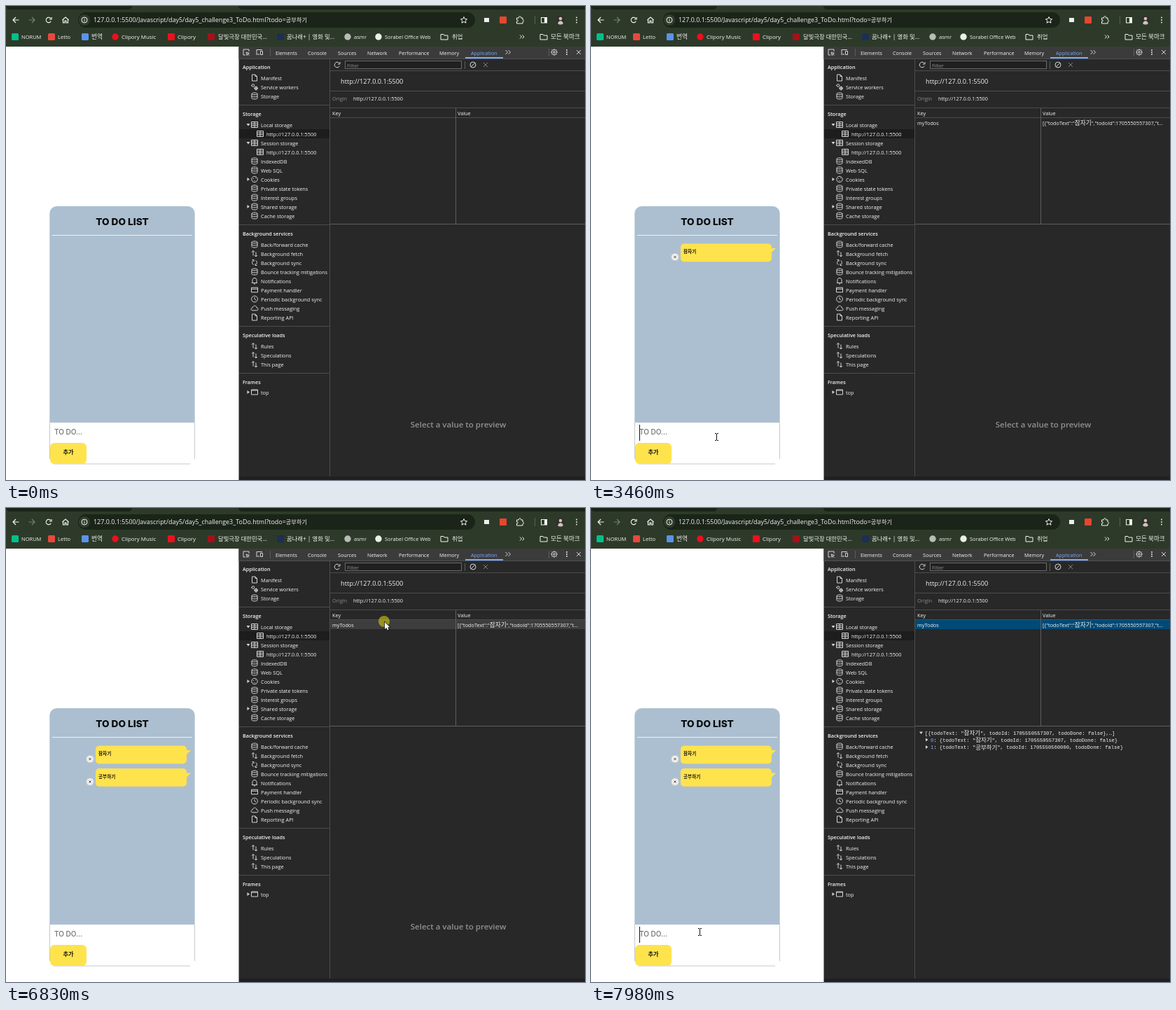
These frames come from a looping animation (827x677 px, 8 s). An HTML page with a canvas:

```html
<!DOCTYPE html>
<html lang="ko">
<head>
<meta charset="utf-8">
<title>To do list</title>
<style>
html, body { margin: 0; width: 100%; height: 100%; overflow: hidden; background: #fff; }
canvas { display: block; width: 827px; height: 677px; }
</style>
</head>
<body>
<canvas id="stage"></canvas>
<script>
const W = 827, H = 677, LOOP = 8000;
const canvas = document.getElementById('stage');
const g = canvas.getContext('2d');
const dpr = window.devicePixelRatio || 1;
canvas.width = W * dpr;
canvas.height = H * dpr;

const UI = '"Open Sans", "Noto Sans CJK KR", sans-serif';
const ROUND = 'Inter, "Noto Sans CJK KR", sans-serif';
const MONO = '"Liberation Mono", "Noto Sans CJK KR", monospace';
const LIGHT = '#f4f4f4', ICON = '#d4d4d4', LINE = '#4c4c4c', PANEL = '#282828';
const YELLOW = '#ffe34d', BLUE = '#acbfd0';

// ---- drawing helpers ----
function rect(x, y, w, h, color) {
  g.fillStyle = color;
  g.fillRect(x, y, w, h);
}

function round(x, y, w, h, r, color) {
  g.fillStyle = color;
  g.beginPath();
  g.roundRect(x, y, w, h, r);
  g.fill();
}

function disc(x, y, r, color) {
  g.fillStyle = color;
  g.beginPath();
  g.arc(x, y, r, 0, 7);
  g.fill();
}

function ring(x, y, r, from = 0, to = 2 * Math.PI) {
  g.beginPath();
  g.arc(x, y, r, from, to);
  g.stroke();
}

function path(d, x, y, fill) {
  g.save();
  g.translate(x, y);
  const p = new Path2D(d);
  if (fill) { g.fillStyle = fill; g.fill(p); } else g.stroke(p);
  g.restore();
}

function pen(color, width = 1) {
  g.strokeStyle = color;
  g.lineWidth = width;
}

// y is the middle of the capitals
function text(s, x, y, size, color = LIGHT, family = UI, weight = 400, align = 'left') {
  g.font = `${weight} ${size}px ${family}`;
  g.fillStyle = color;
  g.textAlign = align;
  g.fillText(s, x, Math.round(y + size * 0.36));
  return g.measureText(s).width;
}

// Hangul runs are set a little larger than the Latin ones
function mixed(s, x, y, size, color, family) {
  for (const run of s.split(/([가-힣]+)/)) {
    const hangul = /[가-힣]/.test(run);
    x += text(run, x, y, hangul ? size * 1.19 : size, color, hangul ? UI : family);
  }
}

// ---- browser bars ----
const marks = [
  ['NORUM', 22, 7.5, 13, '#00c08a', 0],
  ['Letto', 74, 7.6, 65, '#e8483c', 0],
  ['번역', 122, 8.6, 113, '#5a93e8', 0],
  ['Clipory Music', 165, 7.9, 156, '#f00f1c', 1],
  ['Clipory', 245, 8, 236, '#f00f1c', 0],
  ['달빛극장 대한민국...', 303, 8.3, 293, '#a5101a', 0],
  ['꿈나래+ | 영화 및...', 401, 8.3, 392, '#1c2f56', 0],
  ['asmr', 497, 7.6, 488, '#b9bcb8', 1],
  ['Sorabel Office Web', 541, 7.4, 532, '#eceeea', 1],
];

function folder(x, y) {
  pen(LIGHT);
  path('M-5 -3.5H-1L0 -2H5V4H-5Z', x, y);
}

function dots(x, y, step) {
  for (const k of [-1, 0, 1]) disc(x, y + k * step, 0.9, LIGHT);
}

function browser() {
  rect(0, 0, W, 58, '#2d3a29');
  round(0, -6, 180, 11, 5, '#1b2418');
  round(332, -6, 500, 11, 5, '#1b2418');
  pen(LIGHT, 1.2);
  path('M4.5 0H-4M0 -4L-4 0L0 4', 14, 20);
  ring(61, 20, 3.7, 0.5, 5.6);
  path('M4 -4V-1H1', 61, 20);
  path('M-3.5 -.5V4H-1V1H1V4H3.5V-.5M-4.5 0L0 -4L4.5 0', 85, 20);
  pen('#77806f', 1.2);
  path('M-4.5 0H4M0 -4L4 0L0 4', 37, 20);
  round(103, 9, 567, 22, 11, '#1b2418');
  disc(112, 20, 8, '#303c2c');
  pen(LIGHT);
  ring(112, 20, 4);
  path('M0 -.5V2.2M0 -2.4V-1.4', 112, 20);
  const w = text('127.0.0.1:5500/Javascript/day5/day5_challenge3_ToDo.html?todo=', 125, 20, 8.95);
  text('공부하기', 125 + w, 20, 8.2);
  path('M0 -4.5L1.4 -1.5L4.6 -1.2L2.2 1L3 4.2L0 2.5L-3 4.2L-2.2 1L-4.6 -1.2L-1.4 -1.5Z', 654, 20);
  rect(683, 17, 7, 6, '#eeeeee');
  round(705, 15, 10, 10, 1, '#e8452e');
  path('M-4.5 -3H-1.5C-2 -6 2 -6 1.5 -3H4V0C6 -.5 6 3 4 2.5V5H-4.5V2C-2 2.5 -2 -1 -4.5 0Z', 734, 20);
  rect(755, 14, 1, 12, '#56634f');
  g.strokeRect(764.5, 16.5, 8, 7.5);
  rect(769, 16, 4, 8, LIGHT);
  disc(792, 20, 6.5, '#33302c');
  disc(792, 18, 2.3, '#cfc4be');
  path('M-3.8 5C-3 0 3 0 3.8 5C2 7 -2 7 -3.8 5Z', 792, 20, '#cfc4be');
  dots(815, 20, 3.5);

  for (const [label, x, size, ix, color, circle] of marks) {
    if (circle) disc(ix, 44, 4.7, color);
    else round(ix - 5, 39, 10, 10, 1.5, color);
    text(label, x, 44, size);
  }
  folder(626, 44);
  text('취업', 637, 44, 8.4);
  path('M-3 -2.5L-.5 0L-3 2.5M.5 -2.5L3 0L.5 2.5', 737, 44);
  folder(768, 44);
  text('모든 북마크', 778, 44, 8.6);
}

// ---- sidebar ----
const icons = {
  db: 'M-4 -3C-4 -5 4 -5 4 -3V3C4 5 -4 5 -4 3ZM-4 -3C-4 -1.3 4 -1.3 4 -3M-4 0C-4 1.8 4 1.8 4 0',
  grid: 'M-4.5 -4H4.5V4H-4.5ZM-4.5 -1.3H4.5M-4.5 1.3H4.5M0 -4V4',
  doc: 'M-3.5 -4.5H1L3.5 -2V4.5H-3.5ZM1 -4.5V-2H3.5',
  gears: 'M-3.8 -2A1.8 1.8 0 1 1 -.2 -2A1.8 1.8 0 1 1 -3.8 -2M0 2A2.2 2.2 0 1 1 4.4 2A2.2 2.2 0 1 1 0 2M-5 -2H-4M2.2 -1V5M-.8 2H5',
  cookie: 'M-4.2 0A4.2 4.2 0 1 1 4.2 0A4.2 4.2 0 1 1 -4.2 0M-2 -1H-1M1 -2H2M0 2H1M-2 2H-1.5',
  swap: 'M-2 3V-4M-4 -2L-2 -4L0 -2M2 -2V4.5M0 2.5L2 4.5L4 2.5',
  sync: 'M-1.4 3.1A3.4 3.4 0 0 1 -1.7 -3M1.6 -3A3.4 3.4 0 0 1 1.8 2.9M-3.5 -4H-1V-1.5M3.5 4H1V1.5',
  bell: 'M-4 3H4M-3 3V-1C-3 -5 3 -5 3 -1V3M-1 4.5H1',
  card: 'M-4.5 -3.3H4.5V3.3H-4.5ZM-4.5 -1.2H4.5',
  clock: 'M-4.4 0A4.4 4.4 0 1 1 4.4 0A4.4 4.4 0 1 1 -4.4 0M0 -2.5V0L2 1.5',
  cloud: 'M-3 3.3C-6 3 -5 -1 -2.6 -.7C-2 -4.5 3 -4 3 -.5C6 -.3 5.5 3.3 3.2 3.3Z',
  frame: 'M-4.5 -3.5H4.5V3.5H-4.5ZM-4.5 -2.5H4.5',
};

const HOST = 'http://127.0.0.1:5500';
// header, header y, first row y, rows: icon + label; ">" closed, "v" open, "-" indented
const groups = [
  ['Application', 87, 103, ['doc Manifest', 'gears Service workers', 'db Storage']],
  ['Storage', 154, 170, ['vgrid Local storage', '-grid ' + HOST, 'vgrid Session storage', '-grid ' + HOST,
    'db IndexedDB', 'db Web SQL', '>cookie Cookies', 'db Private state tokens', 'db Interest groups',
    '>db Shared storage', 'db Cache storage']],
  ['Background services', 325, 341, ['db Back/forward cache', 'swap Background fetch', 'sync Background sync',
    'db Bounce tracking mitigations', 'bell Notifications', 'card Payment handler',
    'clock Periodic background sync', 'cloud Push messaging', 'doc Reporting API']],
  ['Speculative loads', 470, 486, ['swap Rules', 'swap Speculations', 'swap This page']],
  ['Frames', 537, 552, ['>frame top']],
];

function twisty(x, y, open) {
  path(open ? 'M-2.5 -1.5H2.5L0 2Z' : 'M-1.5 -2.5V2.5L2 0Z', x, y, ICON);
}

function sidebar() {
  rect(333, 176, 129, 13, '#1d1d1d');
  for (const [title, ty, first, rows] of groups) {
    text(title, 338, ty, 7.25, LIGHT, UI, 600);
    rows.forEach((row, i) => {
      const [, mark, icon, label] = row.match(/^([v>-]?)(\w+) (.*)$/);
      const y = first + i * 13, shift = mark === '-' ? 8 : 0;
      if (mark && !shift) twisty(346, y - 0.5, mark === 'v');
      pen(ICON);
      path(icons[icon], 355 + shift, y - 0.5);
      text(label, 364 + shift, y, 7.35);
    });
  }
  for (const y of [141, 312, 457, 524]) rect(333, y, 129, 1, LINE);
  rect(462, 76, 1, 597, LINE);
}

// ---- developer tools ----
const tabs = [['Elements', 385], ['Console', 431], ['Sources', 474], ['Network', 516],
  ['Performance', 561], ['Memory', 619], ['Application', 664]];

function tools(s) {
  rect(332.5, 58, 495, 619, PANEL);
  rect(332.5, 58, 495, 18, '#3b3b3b');
  rect(333, 75, 494, 1, '#505050');
  pen(ICON);
  path('M4 -1V-4H-4V4H-1M0 0L4.5 1.5L2 2.3L1.3 4.6ZM2 2.3L4.5 4.5', 343, 66);
  path('M-4 2V-3.5H4M-5 3H0M1.5 -1.5H4.5V3.5H1.5Z', 362, 66);
  rect(377, 61, 1, 11, '#5c5c5c');
  rect(775, 61, 1, 11, '#5c5c5c');
  for (const [label, x] of tabs) text(label, x, 67, 7.2, label === 'Application' ? '#7cacf8' : LIGHT);
  rect(656, 73, 54, 2, '#7cacf8');
  path('M-3.5 -3L-.5 0L-3.5 3M.5 -3L3.5 0L.5 3', 717, 66);
  ring(783, 66, 3.7);
  ring(783, 66, 1.4);
  for (let a = 0; a < 8; a++) {
    const c = Math.cos(a * Math.PI / 4), n = Math.sin(a * Math.PI / 4);
    path(`M${c * 3.7} ${n * 3.7}L${c * 4.8} ${n * 4.8}`, 783, 66);
  }
  dots(801, 66, 3);
  path('M-3 -3L3 3M3 -3L-3 3', 818, 66);
  sidebar();

  pen(ICON);
  ring(473, 84, 3.8, 0.5, 5.6);
  path('M4 -4V-1H1', 473, 84);
  round(484, 78.5, 166, 11, 2, '#202020');
  pen('#6b6b6b');
  g.strokeRect(484.5, 78.5, 166, 11);
  text('Filter', 487, 85, 7.2, '#8f8f8f');
  rect(655, 79, 1, 11, '#5c5c5c');
  pen(ICON);
  ring(667, 84, 4);
  path('M-2.8 2.8L2.8 -2.8', 667, 84);
  pen('#808080');
  path('M-3 -3L3 3M3 -3L-3 3', 685, 84);
  rect(463, 92, 364, 1, LINE);
  text(HOST, 478, 107.5, 9.2);
  rect(463, 121, 364, 1, LINE);
  text('Origin', 466, 132, 7.4, '#8a8a8a');
  text(HOST, 496, 132, 7.3);

  if (s.hover === 'row') rect(463, 160, 364, 13, '#3d3d3d');
  if (s.hover === 'rest') rect(463, 186, 364, 125, '#3d3d3d');
  if (s.selected) rect(463, 160, 364, 13, '#004a77');
  rect(463, 145, 364, 1, LINE);
  rect(463, 159, 364, 1, LINE);
  rect(642, 146, 1, 165, '#5e5e5e');
  rect(463, 311, 364, 1, '#5e5e5e');
  text('Key', 466, 153, 7.3);
  text('Value', 645, 153, 7.3);
  if (s.stored) {
    text('myTodos', 466, 167, 7.3);
    mixed('[{"todoText":"잠자기","todoId":1705550557307,"t...', 645, 167, 7.3, LIGHT, UI);
  }
  if (s.selected) preview();
  else text('Select a value to preview', 646, 598, 11.5, '#919191', UI, 600, 'center');
  rect(333, 672, 494, 5, '#202020');
}

function preview() {
  const entry = (word, id) => `{todoText: "${word}", todoId: ${id}, todoDone: false}`;
  const lines = [entry('잠자기', 1705550557307), entry('공부하기', 1705550560000)];
  twisty(471.5, 321, true);
  mixed(`[${lines[0]},…]`, 477, 321, 7.13, LIGHT, MONO);
  lines.forEach((line, i) => {
    const y = 331 + i * 10.5;
    twisty(479.5, y, false);
    text(i, 485, y, 7.13, '#8ba4ff', MONO);
    mixed(': ' + line, 489.3, y, 7.13, LIGHT, MONO);
  });
}

// ---- to-do page ----
function bubble(word, y) {
  round(128, y, 130, 25.7, 5, YELLOW);
  path('M-2 0H7L-1 8Z', 257, y + 6.5, YELLOW);
  text(word, 132, y + 11.5, 6.6, '#1c1a10', ROUND, 700);
  disc(120, y + 19, 5.5, '#eeeeee');
  pen('#b5b5b5', 0.6);
  ring(120, y + 19, 5.3);
  pen('#333', 0.9);
  path('M-1.4 -1.4L1.4 1.4M1.4 -1.4L-1.4 1.4', 120, y + 19);
}

function page(s) {
  rect(0, 58, 333, 619, '#fff');
  pen('#c4c8cc');
  g.beginPath();
  g.moveTo(62.5, 595);
  g.lineTo(62.5, 647);
  g.moveTo(269.5, 595);
  g.lineTo(269.5, 647);
  g.moveTo(68, 654);
  g.lineTo(263, 654);
  g.stroke();
  round(62.3, 286, 207.4, 309, [10, 10, 0, 0], BLUE);
  text('TO DO LIST', 166, 308.3, 13.7, '#0a0a0a', ROUND, 800, 'center');
  rect(66, 327, 200, 1, '#eef2f5');
  s.items.forEach((word, i) => bubble(word, 339.5 + i * 32.5));
  round(63, 624, 52, 30, 6, YELLOW);
  text('추가', 89, 637, 8.2, '#161410', ROUND, 700, 'center');
  let end = 69;
  if (s.typed) end += text(s.typed, 69, 608.5, 9.4, '#222', ROUND);
  else text('TO DO...', 69, 608.3, 10, '#6c6c6c', ROUND, 500);
  if (s.caret) rect(Math.round(end), 598, 1, 23, '#111');
}

// ---- pointer ----
const moves = [
  [170, 256, 676], [290, 226, 650], [400, 190, 622], [520, 179, 615],
  [6050, 179, 615], [6250, 250, 470], [6450, 420, 230], [6620, 528, 116], [6700, 539, 122], [6830, 541, 163],
  [6900, 541, 163], [7070, 553, 299], [7250, 400, 500], [7450, 205, 618], [7660, 132, 632],
  [7800, 142, 616], [7980, 155, 605], [8000, 155, 605],
];

function slope(i, k) {
  const a = moves[i - 1], b = moves[i], c = moves[i + 1];
  if (!a || !c || (a[1] === b[1] && a[2] === b[2]) || (c[1] === b[1] && c[2] === b[2])) return 0;
  return (c[k] - a[k]) / (c[0] - a[0]);
}

function pointerAt(t) {
  if (t < moves[0][0]) return null;
  let i = 0;
  while (i < moves.length - 2 && t >= moves[i + 1][0]) i++;
  const a = moves[i], b = moves[i + 1], d = b[0] - a[0], u = (t - a[0]) / d, v = 1 - u;
  const at = k => a[k] * (1 + 2 * u) * v * v + b[k] * u * u * (3 - 2 * u)
    + d * (slope(i, k) * u * v * v - slope(i + 1, k) * u * u * v);
  return { x: at(1), y: at(2) };
}

function pointer({ x, y }, click) {
  if (click) disc(x - 1, y - 1, 8, 'rgba(205, 200, 20, 0.62)');
  if (x > 63 && x < 270 && y > 595 && y < 623) {
    pen('#111');
    path('M-2.5 -5H-.5M.5 -5H2.5M0 -4.5V4.5M-2.5 5H-.5M.5 5H2.5', Math.round(x) + 0.5, Math.round(y) + 0.5);
    return;
  }
  const arrow = 'M0 0V10L2.3 7.9L3.9 11.3L5.6 10.5L4.1 7.2H7.2Z';
  pen('#111', 1.4);
  path(arrow, x, y);
  path(arrow, x, y, '#fff');
}

// ---- timeline ----
const within = (t, ...spans) => spans.some(([a, b]) => t >= a && t < b);

function typedAt(t) {
  if (within(t, [1450, 2410])) {
    const keys = [[1450, 'ㅈ'], [1560, '자'], [1670, '잠'], [2000, '잠ㅈ'], [2080, '잠자'], [2150, '잠작'], [2230, '잠자기']];
    return keys.filter(k => t >= k[0]).pop()[1];
  }
  if (within(t, [4200, 5080])) {
    const steps = 'ㄱ 고 공 공ㅂ 공부 공붛 공부하 공부학 공부하기'.split(' ');
    return steps[Math.min(8, Math.floor((t - 4200) / 90))];
  }
  return '';
}

function stateAt(t) {
  const p = pointerAt(t);
  const inTable = p && p.x > 463 && p.y >= 160 && p.y < 311;
  return {
    p,
    typed: typedAt(t),
    items: ['잠자기', '공부하기'].slice(0, (t >= 2410) + (t >= 5080)),
    stored: t >= 2440,
    selected: t >= 6870,
    hover: inTable ? (p.y < 173 ? 'row' : 'rest') : '',
    caret: within(t, [720, 1220], [1450, 2970], [3460, 4000], [4200, 5620], [6120, 6620], [7900, LOOP]),
    click: within(t, [680, 790], [6830, 6900]),
  };
}

function draw(now) {
  const s = stateAt(now % LOOP);
  g.setTransform(dpr, 0, 0, dpr, 0, 0);
  browser();
  page(s);
  tools(s);
  if (s.p) pointer(s.p, s.click);
}

let start;
function tick(now) {
  start ??= now;
  draw(Math.max(0, now - start));
  requestAnimationFrame(tick);
}
draw(0);
requestAnimationFrame(tick);
</script>
</body>
</html>
```
